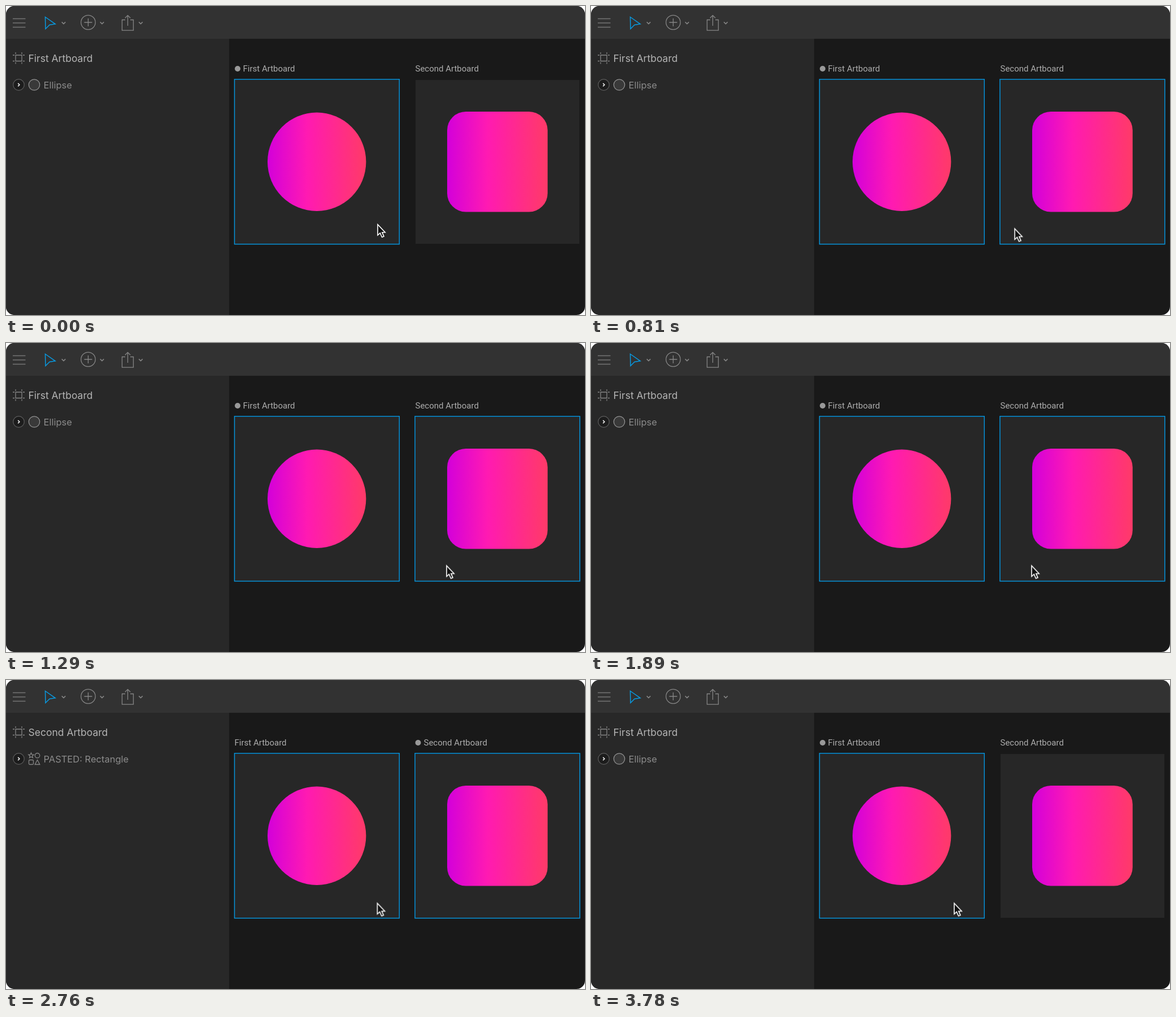
Animation, 1025 px wide and 547 px high, one loop 3.81 s. Source, as an HTML page:

```html
<!DOCTYPE html>
<html lang="en">
<head>
<meta charset="utf-8">
<title>Artboard selection</title>
<style>
  html, body { margin: 0; width: 100%; height: 100%; overflow: hidden; background: #fff; }
  svg { display: block; width: 100%; height: 100%; }
  .line { fill: none; stroke: #858585; stroke-width: 1.3; }
  .title { font: 17.5px Inter, sans-serif; fill: #b4b4b4; }
  .layer { font: 16.5px Inter, sans-serif; fill: #8b8b8b; }
  .label { font: 15px Roboto, sans-serif; fill: #adadad; }
  .outline { fill: none; stroke: #0794dc; stroke-width: 1.5; }

  .first, .second, .outline { animation: 3810ms step-end infinite; }
  .first { animation-name: first; }
  .second { animation-name: second; }
  .outline.a { animation-name: outline-a; }
  .outline.b { animation-name: outline-b; }
  .move-x { animation: move-x 3810ms cubic-bezier(.37, 0, .63, 1) infinite; }
  .move-y { animation: move-y 3810ms cubic-bezier(.37, 0, .63, 1) infinite; }

  /* The second artboard is selected from 2040 ms to 3510 ms. */
  @keyframes first {
    0%, 92.13%, 100% { visibility: visible; }
    53.54% { visibility: hidden; }
  }
  @keyframes second {
    0%, 92.13%, 100% { visibility: hidden; }
    53.54% { visibility: visible; }
  }
  /* Outlines show while an artboard is hovered or selected. */
  @keyframes outline-a {
    0%, 71.65%, 100% { visibility: visible; }
    53.54% { visibility: hidden; }
  }
  @keyframes outline-b {
    0%, 92.13%, 100% { visibility: hidden; }
    19.29% { visibility: visible; }
  }
  @keyframes move-x {
    0%, 11.81% { transform: translateX(657px); }
    25.98%, 68.24% { transform: translateX(779px); }
    73.6%, 100% { transform: translateX(642px); }
  }
  @keyframes move-y {
    0%, 7.87% { transform: translateY(385px); }
    21%, 68.24% { transform: translateY(392.5px); }
    72.3%, 100% { transform: translateY(393.5px); }
  }
</style>
</head>
<body>
<svg viewBox="0 0 1025 547">
  <defs>
    <linearGradient id="pink">
      <stop offset="0" stop-color="#d300da"/>
      <stop offset=".4" stop-color="#ff1ab2"/>
      <stop offset="1" stop-color="#ff3a68"/>
    </linearGradient>
    <clipPath id="window"><rect width="1025" height="547" rx="15"/></clipPath>
    <path id="chevron" class="line" d="M-3.3-1.6 0 1.6 3.3-1.6" style="stroke-width:1.5"/>
  </defs>

  <g clip-path="url(#window)">
    <rect width="1025" height="547" fill="#191919"/>
    <rect y="58" width="395" height="489" fill="#282828"/>
    <rect width="1025" height="58" fill="#323232"/>

    <!-- Toolbar -->
    <path class="line" d="M12 22.5h22.5M12 30h22.5M12 37.5h22.5" style="stroke:#747474"/>
    <path class="line" d="M69.5 19.5 87.2 31.8 77 33.5 70 40.5Z" style="stroke:#0899e0;stroke-width:1.5"/>
    <use href="#chevron" x="102" y="30"/>
    <circle class="line" cx="145.5" cy="29" r="12.7"/>
    <path class="line" d="M138.5 29h14M145.5 22v14"/>
    <use href="#chevron" x="170" y="30"/>
    <path class="line" d="M211 24.5h-5.5v18.7h20v-18.7h-5.5M215.5 35V16.8M210.8 21.3l4.7-4.7 4.7 4.7"/>
    <use href="#chevron" x="238.5" y="30"/>

    <!-- Layer panel -->
    <path class="line" d="M17 87h11v10.5H17ZM12 87h3M30 87h3M12 97.5h3M30 97.5h3M17 82v3M28 82v3M17 99.500v3M28 99.500v3"/>
    <circle cx="22.500" cy="139.500" r="9.800" fill="#1c1c1c" stroke="#5c5c5c" stroke-width="1.200"/>
    <path d="M21.200 136.900l2.700 2.600-2.700 2.600" fill="none" stroke="#eee" stroke-width="1.600"/>
    <g class="first">
      <text class="title" x="39.500" y="99">First Artboard</text>
      <circle cx="50" cy="139.500" r="9.700" fill="#393939" stroke="#929292" stroke-width="1.300"/>
      <text class="layer" x="66.500" y="145.500">Ellipse</text>
    </g>
    <g class="second">
      <text class="title" x="39.500" y="99">Second Artboard</text>
      <path class="line" d="M44.500 129l1.300 3 3.300.3-2.500 2.200.8 3.200-2.900-1.700-2.900 1.700.8-3.200-2.500-2.200 3.300-.3ZM55.500 141.500l4.300 8h-8.600Z"/>
      <circle class="line" cx="55.500" cy="133.700" r="4.200"/>
      <rect class="line" x="40.500" y="141.500" width="8" height="8" rx="1.500"/>
      <text class="layer" x="66.500" y="145.500">PASTED: Rectangle</text>
    </g>

    <!-- Artboards -->
    <rect x="405" y="131" width="290.500" height="290" fill="#272727"/>
    <rect x="725" y="131" width="290" height="290" fill="#272727"/>
    <circle cx="550.200" cy="275.800" r="87.200" fill="url(#pink)"/>
    <rect x="781" y="187" width="177.800" height="177.500" rx="33" fill="url(#pink)"/>
    <g class="first">
      <circle cx="410" cy="111" r="5" fill="#999"/>
      <text class="label" x="419.500" y="115.700">First Artboard</text>
      <text class="label" x="724.500" y="115.700">Second Artboard</text>
    </g>
    <g class="second">
      <text class="label" x="404.500" y="115.700">First Artboard</text>
      <circle cx="729.500" cy="111" r="5" fill="#999"/>
      <text class="label" x="739.500" y="115.700">Second Artboard</text>
    </g>
    <rect class="outline a" x="404.500" y="129.800" width="291.800" height="291.800"/>
    <rect class="outline b" x="724" y="129.800" width="291.800" height="291.800"/>

    <g class="move-x"><g class="move-y">
      <path d="M1 1.800V20.800L5.300 16.900 8.600 24.300 12 22.800 8.800 15.700H14.200Z"
            fill="#111" stroke="#fff" stroke-width="1.600"/>
    </g></g>
  </g>
</svg>
</body>
</html>
```
